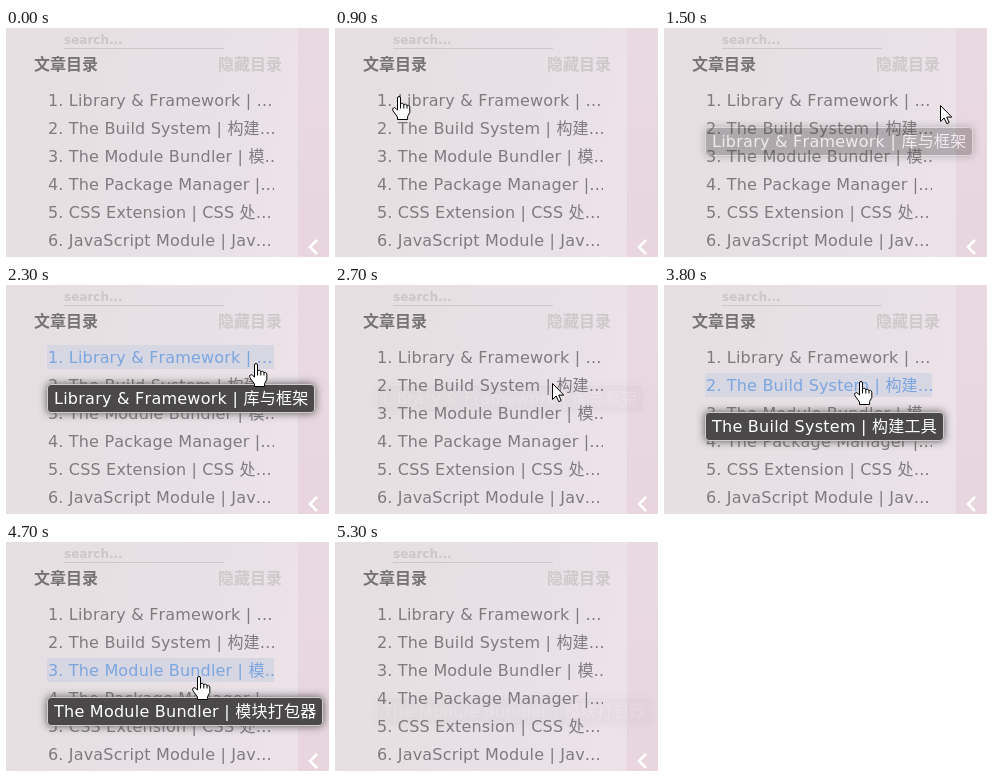
Recreate the animation shown at these times as an HTML page. Size 323 by 229 pixels, loop 5700 ms.

```html
<!DOCTYPE html>
<html lang="zh-CN">
<head>
<meta charset="utf-8">
<title>文章目录</title>
<style>
  html, body { margin: 0; width: 100%; height: 100%; overflow: hidden; }
  #stage {
    position: relative; width: 323px; height: 229px; overflow: hidden;
    background: linear-gradient(100deg, #e5dfe2, #e7e0e4 45%, #ece2e8 85%, #ece0e7);
    color: #7f7b7e;
    font: 16px/26px "DejaVu Sans", "Noto Sans CJK SC", sans-serif;
    font-kerning: none; white-space: pre;
  }
  #stage > * { position: absolute; }
  .side { left: 292px; top: 0; width: 31px; height: 229px; background: linear-gradient(#e9dae1, #e8d5de); }
  .search {
    left: 58px; top: 2px; width: 160px; height: 18px; border-bottom: 1px solid #cfc8cb;
    color: #cdc6ca; font-size: 12px; font-weight: bold; line-height: 20px;
  }
  .head { top: 22px; font-family: "Noto Sans CJK SC", sans-serif; font-weight: bold; }
  .title { left: 28px; color: #777375; }
  .hide { left: 212px; color: #cfc9cc; }
  .row {
    left: 41px; width: 226px; height: 24px; padding-left: 1px;
    overflow: hidden; letter-spacing: .17px;
  }
  .row.on { color: #7ba6df; background: #d7d6e3; }
  .tip {
    left: 41px; padding: 1px 6px 0; color: #fff; background: #4b4849; letter-spacing: .25px;
    border: 1px solid #d0cccd; border-radius: 4px; box-shadow: 0 0 8px #555; opacity: 0;
  }
  svg { left: 0; top: 0; width: 323px; height: 229px; z-index: 2; }
</style>
</head>
<body>
<div id="stage">
  <div class="side"></div>
  <div class="search">search...</div>
  <div class="head title">文章目录</div>
  <div class="head hide">隐藏目录</div>
  <svg viewBox="0 0 323 229">
    <path d="M311 212L304 219L311 226" fill="none" stroke="#fff" stroke-width="2.6"/>
    <g id="cursor" fill="#fff" stroke="#000" stroke-linejoin="round">
      <path id="arrow" d="M.5 .5V16.5L4.2 13L6.8 18.7L9.2 17.6L6.7 12.1H11.8Z"/>
      <g id="hand">
        <path d="M-1.5 14V2Q-1.5 .5 0 .5T1.5 2V8.5Q2 7 3.3 7.2T4.8 9Q5.3 7.9 6.6 8.2T8 10Q8.5 9 9.6 9.4T10.8 11.2V16.5L8.6 20.5V23.5H-1.5V21L-6 14.8Q-7 12.8 -5.7 12T-3.3 12.4Z"/>
        <path d="M1.5 8V12.5M4.8 9V12.5M8 10V12.5" fill="none"/>
      </g>
    </g>
  </svg>
</div>
<script>
const LOOP = 5700, STEP = 100, PITCH = 28;
const FADE_IN = 200, FADE_OUT = 310, LIGHT_DELAY = 100;
const stage = document.getElementById('stage');
const [cursor, arrow, hand] = ['cursor', 'arrow', 'hand'].map(id => document.getElementById(id));

const titles = [
  'Library & Framework | …', 'The Build System | 构建…', 'The Module Bundler | 模…',
  'The Package Manager |…', 'CSS Extension | CSS 处…', 'JavaScript Module | Jav…'
];
const tipTexts = ['Library & Framework | 库与框架', 'The Build System | 构建工具', 'The Module Bundler | 模块打包器'];

function add(className, top, text) {
  const el = document.createElement('div');
  el.className = className;
  el.style.top = top + 'px';
  el.textContent = text;
  return stage.appendChild(el);
}
const rows = titles.map((text, i) => add('row', 60 + PITCH * i, `${i + 1}. ${text}`));
const tips = tipTexts.map((text, i) => add('tip', 99 + PITCH * i, text));

const entry = { x: 10, y: 0 };
const moves = [
  { from: 500, to: 900, x: 64, y: 68 },
  { from: 1000, to: 1300, x: 276, y: 77 },
  { from: 1500, to: 1600, x: 250, y: 78 },
  { from: 2300, to: 2700, x: 217, y: 98 },
  { from: 3200, to: 3400, x: 197, y: 96 },
  { from: 3800, to: 4300, x: 193, y: 134 },
  { from: 4800, to: 5300, x: 300, y: 90 }
];
const visits = [
  { row: 0, enter: 900, tip: 1000, leave: 1300 },
  { row: 0, enter: 1600, tip: 1600, leave: 2400 },
  { row: 1, enter: 2800, tip: 3200, leave: 4000 },
  { row: 2, enter: 4300, tip: 4500, leave: 5000 }
];

const clamp = v => Math.max(0, Math.min(1, v));
const show = (el, on) => { el.style.display = on ? '' : 'none'; };

function cursorAt(t) {
  return moves.reduce((pos, m) => {
    const p = clamp((t - m.from) / (m.to - m.from));
    return { x: pos.x + (m.x - pos.x) * p, y: pos.y + (m.y - pos.y) * p };
  }, entry);
}

function tipOpacity(visit, t) {
  return t < visit.leave
    ? clamp((t - visit.tip) / FADE_IN)
    : clamp(1 - (t - visit.leave) / FADE_OUT);
}

function draw(ms) {
  const t = Math.floor(ms % LOOP / STEP) * STEP;
  const { x, y } = cursorAt(t);
  const pointing = visits.find(v => t >= v.enter && t < v.leave);
  const lit = pointing && t >= pointing.enter + LIGHT_DELAY ? pointing.row : -1;

  show(cursor, t >= moves[0].from && t < moves[moves.length - 1].to);
  show(hand, pointing);
  show(arrow, !pointing);
  cursor.setAttribute('transform', `translate(${Math.round(x)} ${Math.round(y)})`);
  rows.forEach((row, i) => row.classList.toggle('on', i === lit));
  tips.forEach((tip, i) => {
    const own = visits.filter(v => v.row === i);
    tip.style.opacity = Math.max(...own.map(v => tipOpacity(v, t)));
  });
}

const start = performance.now();
function tick() {
  draw(performance.now() - start);
  requestAnimationFrame(tick);
}
tick();
</script>
</body>
</html>
```
